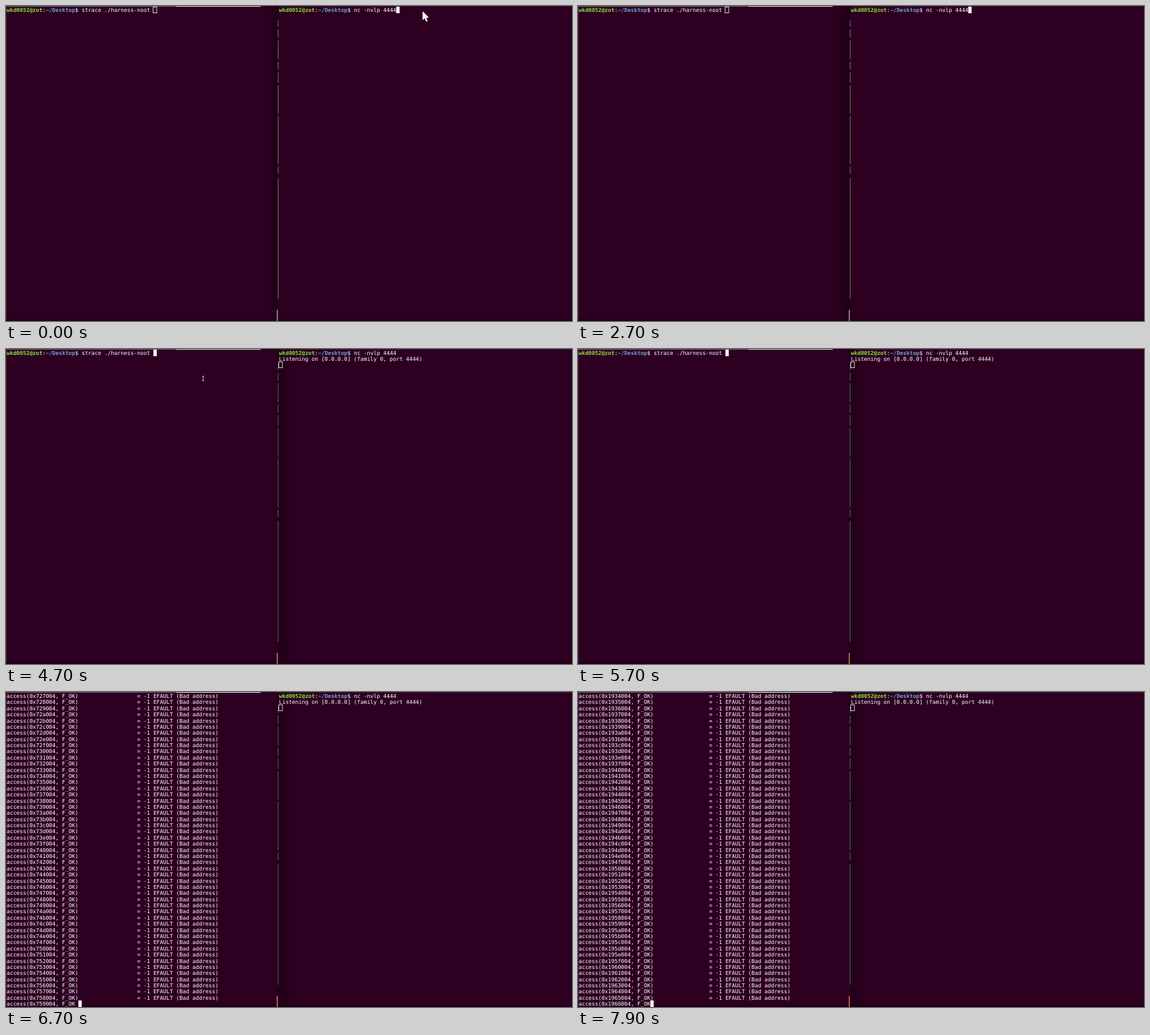
Write an HTML page with a canvas that moves like this. It is 860 by 480 pixels and loops after 8 s.

```html
<!DOCTYPE html>
<html lang="en">
<head>
<meta charset="utf-8">
<title>Two terminals</title>
<style>
html, body { margin: 0; width: 100%; height: 100%; overflow: hidden; background: #2d0022; }
canvas { display: block; }
</style>
</head>
<body>
<canvas id="stage" width="860" height="480"></canvas>
<script>
const ctx = document.getElementById('stage').getContext('2d');
const LOOP = 8000, STEP = 100;
const BG = '#2d0022', WHITE = '#fff', GREEN = '#8ae234', BLUE = '#729fcf';
const SIZE = 8.23, CELL = SIZE * 0.602, ROWS = 51;
const LEFT = { x: 1, base: 9, line: 9.385 };
const RIGHT = { x: 414.8, base: 8.5, line: 9.3 };
const FOCUS_LEFT = 4600, LISTEN = 2800, RUN = 6200;

function rect(x, y, w, h, color) {
  ctx.fillStyle = color;
  ctx.fillRect(x, y, w, h);
}

function text(pane, col, row, str, color = WHITE, bold = false) {
  ctx.font = `${bold ? 'bold ' : ''}${SIZE}px "DejaVu Sans Mono", monospace`;
  ctx.fillStyle = color;
  ctx.fillText(str, pane.x + col * CELL, pane.base + row * pane.line);
}

function prompt(pane, command) {
  text(pane, 0, 0, 'wkd0052@zot', GREEN, true);
  text(pane, 11, 0, ':');
  text(pane, 12, 0, '~/Desktop', BLUE, true);
  text(pane, 21, 0, '$ ' + command);
}

function cursor(pane, col, row, solid) {
  const x = Math.round(pane.x + col * CELL);
  const y = Math.round(pane.base + row * pane.line - 8);
  if (solid) {
    rect(x, y, 5, 10, WHITE);
  } else {
    ctx.strokeStyle = '#d8ccd5';
    ctx.lineWidth = 1;
    ctx.strokeRect(x - 0.5, y + 0.5, 5.5, 9);
  }
}

function shadow(from, to) {
  const g = ctx.createLinearGradient(from, 0, to, 0);
  g.addColorStop(0, 'rgba(20,0,14,0)');
  g.addColorStop(1, 'rgba(20,0,14,.5)');
  rect(Math.min(from, to), 0, Math.abs(to - from), 480, g);
}

function frameEdges(leftActive) {
  rect(0, 0, 860, 480, BG);
  if (leftActive) shadow(440, 414);
  else shadow(387, 413);
  rect(0, 0, 1, 480, '#45203b');
  rect(0, 0, 259, 1, '#74606e');
  rect(259, 0, 128, 1, '#e4dfe2');
  rect(414, 0, 446, 1, '#3d1a33');
  rect(0, 477, 860, 3, '#210018');
  rect(412, 0, 1, 480, '#1d0016');
  const dashes = [[22, 32], [36, 48], [52, 81], [85, 97], [101, 117],
    [121, 164], [167, 241], [245, 256], [262, 446]];
  for (const [a, b] of dashes) rect(413, a, 1, b - a, leftActive ? '#59616a' : '#716b6b');
  rect(411.5, 463, 1.5, 17, leftActive ? '#d0794e' : '#a39a9d');
}

function arrow(x, y) {
  const points = [[0, 0], [0, 13.5], [3.2, 10.8], [5.6, 16], [7.7, 15], [5.4, 10], [9.5, 9.5]];
  ctx.beginPath();
  for (const [dx, dy] of points) ctx.lineTo(x + dx, y + dy);
  ctx.closePath();
  ctx.fillStyle = WHITE;
  ctx.fill();
}

function beam(x, y) {
  const color = '#c5b8c0';
  rect(x, y - 4, 1, 8, color);
  rect(x - 1, y - 4, 3, 1, color);
  rect(x - 1, y + 3, 3, 1, color);
}

function trace(t) {
  const s = (t - RUN) / 1000;
  const last = Math.round(775 + 1728.8 * s + 964.7 * s * s);
  const partial = (t - RUN) / STEP % 4 === 1;
  for (let row = 0; row < ROWS; row++) {
    const page = last - ROWS + 1 + row;
    const cut = partial && row === ROWS - 1;
    const call = `access(0x${page.toString(16)}004, F_OK`;
    text(LEFT, 0, row, cut ? call : call + ')');
    if (!cut) text(LEFT, 40, row, '= -1 EFAULT (Bad address)');
  }
  if (t < 7000 || t >= 7800) cursor(LEFT, partial ? 22 : 65, ROWS - 1, true);
}

function leftPane(t) {
  if (t >= RUN) return trace(t);
  prompt(LEFT, 'strace ./harness-noot');
  if (t < FOCUS_LEFT) cursor(LEFT, 45, 0, false);
  else if (t < 5000 || t >= 5400) cursor(LEFT, 45, 0, true);
}

function rightPane(t) {
  prompt(RIGHT, 'nc -nvlp 4444');
  if (t < LISTEN) {
    const off = (t >= 100 && t < 900) || (t >= 1900 && t < 2700);
    if (!off) cursor(RIGHT, 36, 0, true);
    return;
  }
  text(RIGHT, 0, 1, 'Listening on [0.0.0.0] (family 0, port 4444)');
  if (t >= FOCUS_LEFT) cursor(RIGHT, 0, 2, false);
  else if (t < 3400 || t >= 4200) cursor(RIGHT, 0, 2, true);
}

function draw(t) {
  ctx.textRendering = 'geometricPrecision';
  frameEdges(t >= FOCUS_LEFT);
  leftPane(t);
  rightPane(t);
  if (t < 100) arrow(633, 8);
  if (t >= 3500 && t < 4800) beam(299, 45);
}

const start = performance.now();
let shown = -1;
function tick() {
  const t = Math.floor((performance.now() - start) % LOOP / STEP) * STEP;
  if (t !== shown) draw(shown = t);
  requestAnimationFrame(tick);
}
tick();
</script>
</body>
</html>
```
